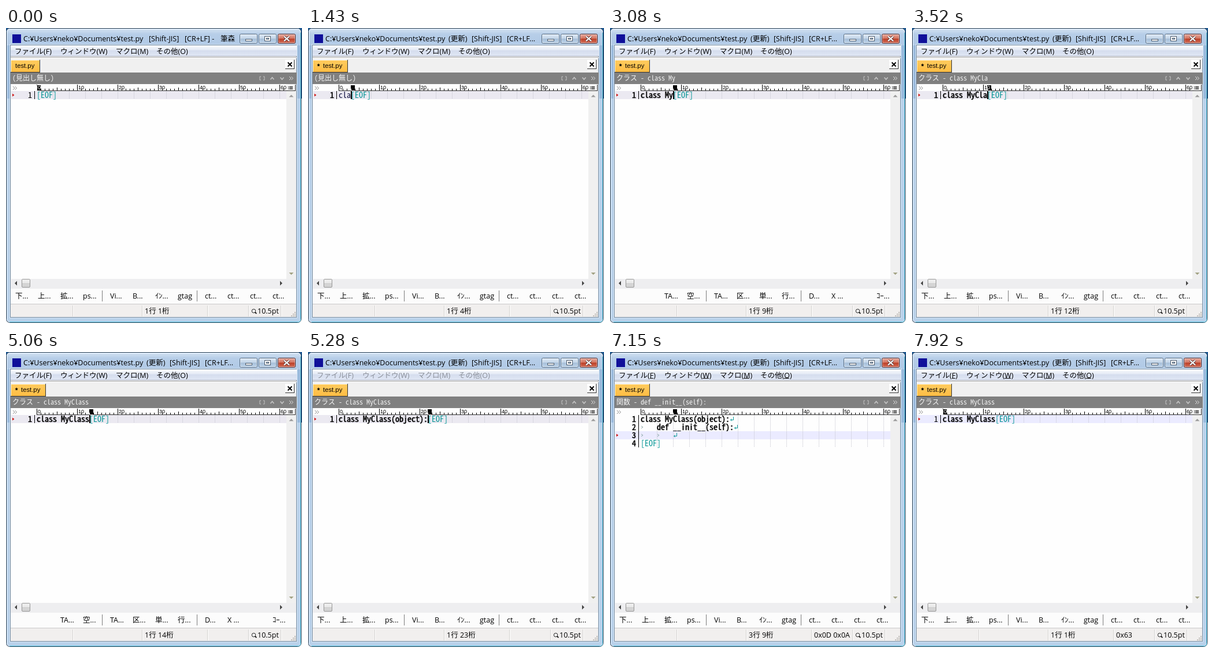
An HTML page for the animation above (8000 ms loop, 512 px wide and 512 px high).

```html
<!DOCTYPE html>
<html lang="ja">
<head>
<meta charset="utf-8">
<title>Editor</title>
<style>
html, body { margin: 0; width: 100%; height: 100%; overflow: hidden; background: #fff; }
svg { display: block; width: 512px; height: 512px; }
text { white-space: pre; font: 12.5px "Open Sans", "Noto Sans CJK JP", "Noto Sans CJK", sans-serif; }
.code { font: 14px "Noto Sans Mono CJK JP", "Noto Sans Mono", "Noto Sans CJK JP", monospace; }
.head { font: 12px "Noto Sans Mono CJK JP", "Noto Sans Mono", "Noto Sans CJK JP", monospace; }
.tab { font: 11.3px "Liberation Sans", sans-serif; }
.mark { font: 9px "Liberation Sans", sans-serif; }
.bold { stroke: #000; stroke-width: .5px; }
.invert { mix-blend-mode: difference; }
</style>
</head>
<body>
<svg id="stage" viewBox="0 0 512 512">
  <defs>
    <linearGradient id="glass" x2="0" y2="1">
      <stop offset="0" stop-color="#d3e2f2"/><stop offset=".3" stop-color="#b7cee8"/><stop offset="1" stop-color="#b0c9e6"/>
    </linearGradient>
    <linearGradient id="bar" x2="0" y2="1">
      <stop offset="0" stop-color="#fbfcfe"/><stop offset=".45" stop-color="#e4eaf5"/>
      <stop offset=".5" stop-color="#d5ddee"/><stop offset="1" stop-color="#dfe6f4"/>
    </linearGradient>
    <linearGradient id="btn" x2="0" y2="1">
      <stop offset="0" stop-color="#dfeaf6"/><stop offset=".48" stop-color="#c3d5e8"/>
      <stop offset=".52" stop-color="#a5bed8"/><stop offset="1" stop-color="#c0d6ec"/>
    </linearGradient>
    <linearGradient id="close" x2="0" y2="1">
      <stop offset="0" stop-color="#e9a89b"/><stop offset=".48" stop-color="#d27460"/>
      <stop offset=".52" stop-color="#bb3d25"/><stop offset="1" stop-color="#d5705a"/>
    </linearGradient>
    <linearGradient id="tabFill" x2="0" y2="1">
      <stop offset="0" stop-color="#ffcb5e"/><stop offset="1" stop-color="#ffbd44"/>
    </linearGradient>
  </defs>
</svg>
<script>
const LOOP = 8000, CELL = 7, LEFT = 53, TOP = 109, ROW = 14;
const stage = document.getElementById('stage');

function add(parent, tag, attrs, text) {
  const el = document.createElementNS('http://www.w3.org/2000/svg', tag);
  for (const k in attrs) el.setAttribute(k, attrs[k]);
  if (text !== undefined) el.textContent = text;
  parent.appendChild(el);
  return el;
}
const group = () => add(stage, 'g', {});
const rect = (g, x, y, width, height, fill, more) => add(g, 'rect', { x, y, width, height, fill, ...more });
const path = (g, d, stroke, width = 1, fill = 'none') =>
  add(g, 'path', { d, stroke, fill, 'stroke-width': width });
const label = (g, x, y, text, fill = '#000', cls = '') => add(g, 'text', { x, y, fill, class: cls }, text);

// Text on a fixed grid; wide characters take two cells.
function gridText(g, x, y, text, cell, fill, cls) {
  const xs = [];
  for (const ch of text) {
    xs.push(x);
    x += ch.charCodeAt(0) > 0x2fff ? 2 * cell : cell;
  }
  return label(g, xs.join(' '), y, text, fill, cls);
}

// Box with a light top-left and a dark bottom-right edge.
function raised(g, x, y, w, h, fill) {
  rect(g, x, y, w, h, '#333');
  rect(g, x, y, w - 1, h - 1, '#fff');
  rect(g, x + 1, y + 1, w - 2, h - 2, fill);
}

function drawWindow(g) {
  rect(g, 0, 0, 512, 512, '#fff');
  rect(g, 0, 0, 512, 122, '#1f5a94');
  rect(g, .5, .5, 510, 509, '#b9d1ea', { rx: 6, stroke: '#22384e' });
  rect(g, 2, 2, 507, 28, 'url(#glass)', { rx: 4 });
  for (const x of [2, 504]) rect(g, x, 30, 5, 92, '#5f8fc0', { opacity: .35 });
  rect(g, 1.5, 1.5, 508, 507, 'none', { rx: 5, stroke: '#e6f1fb' });
  path(g, 'M509.5 8v496q0 4.5-4.5 4.5H6', '#62d3ee');
  rect(g, 6.5, 28.5, 497, 473, 'none', { stroke: '#d9e8f6' });
  rect(g, 7.5, 29.5, 495, 471, '#f0f0f0', { stroke: '#6f879f' });
  rect(g, 11, 11, 15, 15, '#10109a');

  for (const [x, fill, edge] of [[404.5, 'url(#btn)', '#52687f'], [437.5, 'url(#btn)', '#52687f'], [470.5, 'url(#close)', '#4a2427']]) {
    rect(g, x, 10.5, 30, 16, fill, { rx: 2, stroke: edge });
    rect(g, x + 1, 11.5, 28, 14, 'none', { rx: 1, stroke: '#fff', 'stroke-opacity': .45 });
  }
  rect(g, 414.5, 19.5, 11, 3, '#fff', { stroke: '#4e5b6b' });
  rect(g, 447.5, 14.5, 10, 8, '#fff', { stroke: '#4e5b6b' });
  rect(g, 450.5, 17.5, 4, 2, '#b5cbe1', { stroke: '#4e5b6b' });
  path(g, 'M481 14.5l9 8M490 14.5l-9 8', '#5a3b3b', 4);
  path(g, 'M481 14.5l9 8M490 14.5l-9 8', '#fff', 2.2);

  rect(g, 8, 30, 495, 18, 'url(#bar)');
  rect(g, 8, 48, 495, 1, '#b6bccc');
  rect(g, 8, 50, 495, 1, '#a0a0a0');
  rect(g, 8, 51, 495, 1, '#fff');
  raised(g, 483, 55, 16, 16, '#fff');
  path(g, 'M487.5 59.5l7 7M494.5 59.5l-7 7', '#000', 2);

  rect(g, 8, 77, 495, 20, '#808080');
  path(g, 'M441 84h-2v6h2M445 84h2v6h-2', '#c4c4c4');
  path(g, 'M457.5 89l3-3.5 3 3.5M474.5 85.5l3 3.5 3-3.5', '#c4c4c4', 1.7);
  path(g, 'M490 84l3 3-3 3M493.5 84l3 3-3 3', '#e0e0e0');
}

function drawEditor(g) {
  rect(g, 9, 97, 476, 337, '#fefefe');
  path(g, 'M12 101l3 3-3 3M15.5 101l3 3-3 3', '#8a8a8a');
  rect(g, LEFT, 108, 432, 1, '#333');
  for (let i = 0; i <= 61; i++) {
    const ten = i % 10 === 0, h = ten ? 10 : i % 5 === 0 ? 5 : 3;
    rect(g, LEFT + i * CELL, 108 - h, 1, h, '#000');
    if (ten) label(g, LEFT + i * CELL + 2, 106, i, '#000', 'mark');
  }
  rect(g, 485, 97, 17, 12, '#f0f0f0');
  raised(g, 485, 98, 16, 11, '#f4f4f4');
  for (const y of [101, 103, 105]) {
    rect(g, 488, y, 1, 1, '#000');
    rect(g, 490, y, 6, 1, '#000');
  }

  rect(g, 485, 109, 17, 325, '#f0f0f0');
  path(g, 'M489.5 119.5h8l-4-4z', 'none', 0, '#9a9a9a');
  path(g, 'M489.5 423h8l-4 4z', 'none', 0, '#a3a384');
  rect(g, 9, 434, 493, 17, '#eeeef0');
  path(g, 'M19 437.5v8l-4-4z', 'none', 0, '#444');
  path(g, 'M474 437.5v8l4-4z', 'none', 0, '#444');
  rect(g, 27.5, 434.5, 14, 14, '#d4d4d4', { rx: 1.5, stroke: '#979797' });
  rect(g, 28, 435, 13, 6, '#ececec');
}

function drawFooter(g) {
  rect(g, 8, 451, 494, 26, '#fcfcfc');
  for (const x of [166, 330]) rect(g, x, 454, 1, 19, '#7c7c7c');
  rect(g, 8, 477, 494, 1, '#c9c9c9');
  rect(g, 8, 478, 494, 22, '#f1efee');
  for (const x of [115, 235, 348, 419, 475]) {
    rect(g, x, 480, 1, 19, '#d3d1cf');
    rect(g, x + 1, 480, 1, 19, '#fff');
  }
  add(g, 'circle', { cx: 428.5, cy: 489.5, r: 3.2, fill: '#fff', stroke: '#111' });
  path(g, 'M430.7 491.7l2.6 2.3', '#111', 1.8);
  label(g, 435, 494, '10.5pt');
  for (let i = 0; i < 3; i++)
    for (let j = 0; j <= i; j++) rect(g, 499 - j * 3, 491 + i * 3, 2, 2, '#bdbab6');
}

const MENU = [[15, 'ファイル(F)', 69, 6], [94, 'ウィンドウ(W)', 160, 11], [190, 'マクロ(M)', 231, 10], [260, 'その他(O)', 301, 9]];
const TOOLS = ['下...', '上...', '拡...', 'ps...', 'Vi...', 'B...', 'ｲﾝ...', 'gtag', 'ct...', 'ct...', 'ct...', 'ct...'];
const SHIFT_TOOLS = ['', '', 'TA...', '空...', 'TA...', '区...', '単...', '行...', 'D...', 'X ...', '', 'ｺｰ...'];
const NO_HEAD = '(見出し無し)', CLASS = 'クラス - class ';
const FIRST = 'class MyClass(object):', SECOND = '\tdef __init__(self):';

// Typing puts the caret at the end of the single line.
const type = (text, more) => ({ text, col: text.length, caret: 1, edited: 1, ...more });

const STEPS = [
  [0, { text: '', row: 0, col: 0, caret: 0, edited: 0, title: 0, head: NO_HEAD, code: '', shift: 0, keys: 0, busy: 0, lit: 0 }],
  [440, { caret: 1 }],
  [990, { caret: 0 }],
  [1210, type('c', { title: 1 })],
  [1320, type('cl')],
  [1430, type('cla')],
  [1650, type('clas')],
  [1760, type('class')],
  [2090, type('class ')],
  [2530, { shift: 1 }],
  [2640, type('class M')],
  [2750, { shift: 0, head: CLASS + 'M' }],
  [2860, type('class My')],
  [2970, { head: CLASS + 'My' }],
  [3080, { shift: 1 }],
  [3190, type('class MyC')],
  [3300, { shift: 0, head: CLASS + 'MyC' }],
  [3410, type('class MyCl', { head: CLASS + 'MyCl' })],
  [3520, type('class MyCla', { head: CLASS + 'MyCla' })],
  [3850, type('class MyClas', { head: CLASS + 'MyClas' })],
  [3960, type('class MyClass')],
  [4070, { head: CLASS + 'MyClass' }],
  [4510, { caret: 0 }],
  [5060, { caret: 1, shift: 1 }],
  [5170, { busy: 1 }],
  [5280, type(FIRST, { shift: 0 })],
  [5390, { text: FIRST + '\n' + SECOND, row: 1, col: 23, busy: 0 }],
  [5500, { text: [FIRST, SECOND, '\t\t', ''].join('\n'), row: 2, col: 8, head: '関数 - def __init__(self):', code: '0x0D 0x0A', lit: 1 }],
  [5830, { caret: 0 }],
  [6380, { caret: 1 }],
  [6930, { caret: 0 }],
  [7150, { keys: 1 }],
  [7370, { text: 'class MyClass', row: 0, col: 0, caret: 1, edited: 0, head: NO_HEAD, code: '0x63' }],
  [7590, { head: CLASS + 'MyClass' }],
  [7920, { caret: 0 }]
];
const states = [];
for (const [, change] of STEPS) states.push({ ...states[states.length - 1], ...change });

function drawTitle(g, s) {
  label(g, 30, 23, 'C:¥Users¥neko¥Documents¥test.py');
  if (s.title) {
    label(g, 243, 23, '(更新)');
    label(g, 283, 23, '[Shift-JIS]');
    label(g, 344, 23, '[CR+LF...');
  } else {
    label(g, 247, 23, '[Shift-JIS]');
    label(g, 309, 23, '[CR+LF] -');
    label(g, 371, 23, '筆森');
  }
  raised(g, 8, 55, s.title ? 61 : 51, 22, 'url(#tabFill)');
  if (s.title) label(g, 16, 70, '*', '#000', 'tab bold');
  label(g, s.title ? 26 : 16, 69, 'test.py', '#000', 'tab');
}

function drawLine(g, text, i, s, isLast) {
  const y = TOP + i * ROW;
  if (i === s.row) {
    rect(g, 9, y, 476, ROW, s.lit ? '#ebebff' : '#ebe9f1');
    path(g, `M11 ${y + 4.5}v5l3.5-2.5z`, 'none', 0, '#d01818');
  }
  for (let x = LEFT + 4 * CELL; x < 485; x += 4 * CELL)
    add(g, 'path', { d: `M${x + .5} ${y}v${ROW}`, stroke: '#c3c3cd', 'stroke-dasharray': '1 1' });
  rect(g, 49, y, 1, ROW, '#000');
  gridText(g, 38, y + 12, String(i + 1), CELL, '#000', s.edited ? 'code bold' : 'code');

  let col = 0, word = '';
  for (const ch of text) {
    if (ch === '\t') {
      path(g, `M${LEFT + col * CELL + 1} ${y + 5}l3 2-3 2`, '#8fa9a9');
      col += 4;
    } else word += ch;
  }
  const known = s.head !== NO_HEAD || s.lit;
  gridText(g, LEFT + col * CELL, y + 12, word, CELL, known ? '#000' : '#101040', known ? 'code bold' : 'code');
  const end = LEFT + (col + word.length) * CELL;
  if (isLast) gridText(g, end, y + 12, '[EOF]', CELL, '#009494', 'code');
  else path(g, `M${end + 6.5} ${y + 3}v5.5h-5m2-2l-2 2 2 2`, '#109a9a');
}

function draw(s) {
  live.replaceChildren();
  drawTitle(live, s);
  for (const [x, text, keyX, keyW] of MENU) {
    label(live, x, 45, text, s.busy ? '#8a8f99' : '#000');
    if (s.keys) rect(live, keyX, 45, keyW, 1, '#000');
  }
  gridText(live, 11, 91, s.head, 6, '#f4f4f4', 'head');
  rect(live, LEFT + s.col * CELL, 99, CELL, 10, '#fff', { class: 'invert' });

  const lines = s.text.split('\n');
  lines.forEach((text, i) => drawLine(live, text, i, s, i === lines.length - 1));
  if (s.caret) rect(live, LEFT + s.col * CELL, TOP + s.row * ROW, 2, ROW, '#000');

  (s.shift ? SHIFT_TOOLS : TOOLS).forEach((text, i) =>
    label(live, 16 + i * 39 + Math.floor(i / 4) * 8, 468, text));
  label(live, 240, 494, `${s.row + 1}行 ${s.col + 1}桁`);
  label(live, 353, 494, s.code);
}

const base = group(), live = group();
drawWindow(base);
drawEditor(base);
drawFooter(base);

let shown = -1;
function tick() {
  const t = performance.now() % LOOP;
  let i = STEPS.length - 1;
  while (STEPS[i][0] > t) i--;
  if (i !== shown) draw(states[shown = i]);
  requestAnimationFrame(tick);
}
tick();
</script>
</body>
</html>
```
